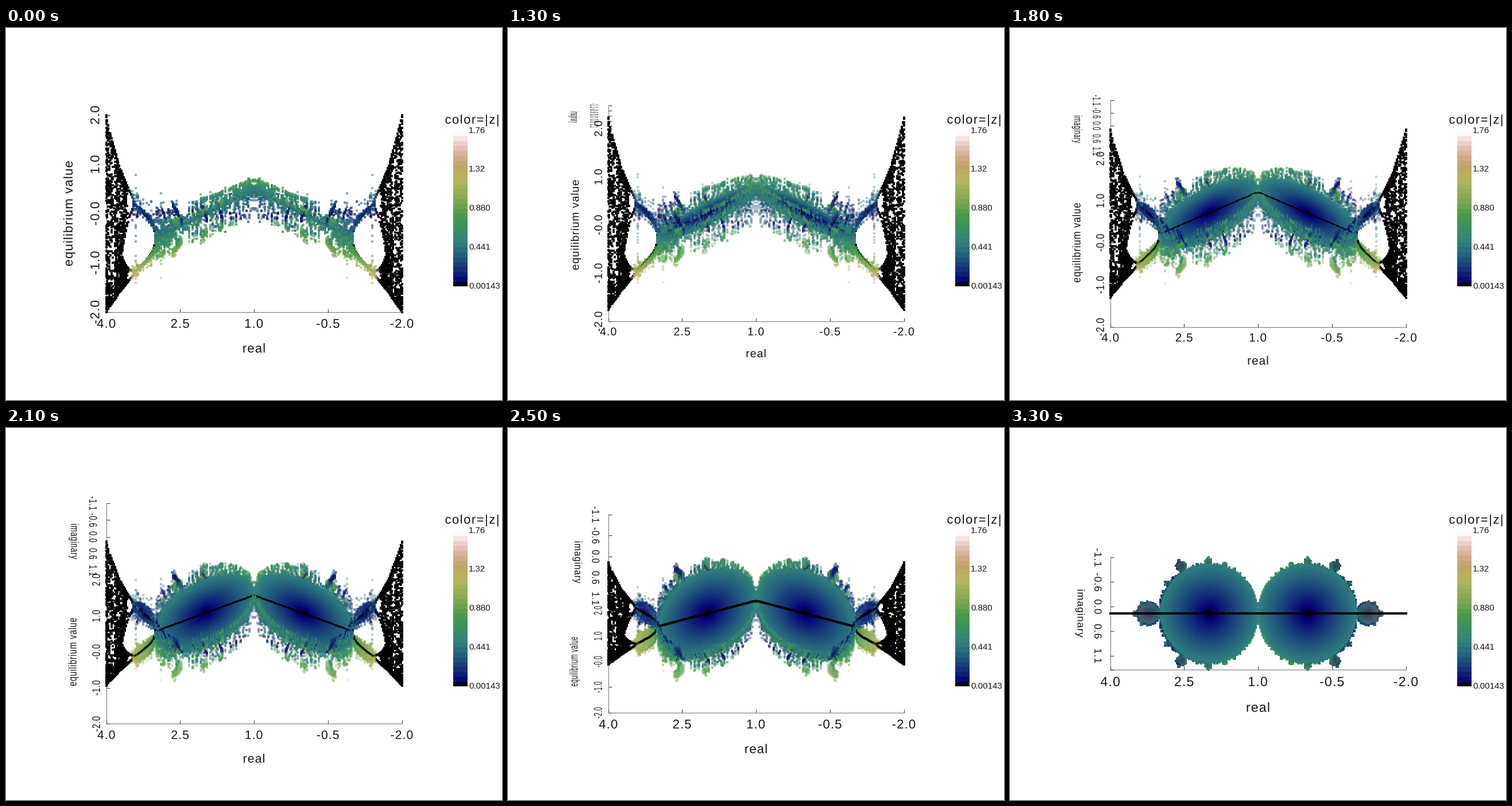
A matplotlib script for the animation above (4400 ms loop, 864x648 px).

```python
import numpy as np
import matplotlib.pyplot as plt
from matplotlib.animation import FuncAnimation
from matplotlib.collections import LineCollection
from matplotlib.patches import PathPatch
from matplotlib.path import Path
from matplotlib.textpath import TextPath

W, H = 864, 648
SCALE, LEFT, RIGHT, MID = 85.8, 174.5, 689.5, 323.3
IM_MAX = 1.14
STEPS, HOLD = 23, 10
EM = 23.1
INK = "#151515"
VMIN, VMAX = 0.00143, 1.76

plt.rcParams["font.family"] = "Liberation Sans"
cmap = plt.get_cmap("gist_earth", 64)

fig = plt.figure(figsize=(W / 100, H / 100), dpi=100, facecolor="white")
ax = fig.add_axes([0, 0, 1, 1])


# ---- data: attracting cycles of z -> z^2 + c with c = r/2 - r^2/4 ----
def cycles(r, keep, burn=200):
    """Return r, z and cycle length for every distinct point of the cycles."""
    c = r / 2 - r * r / 4
    z = np.full_like(c, 0.01)
    with np.errstate(all="ignore"):
        for n in range(burn):
            z = z * z + c
            if n % 40 == 39:
                ok = np.abs(z) < 4
                r, c, z = r[ok], c[ok], z[ok]
        orbit = []
        for _ in range(keep):
            z = z * z + c
            orbit.append(z)
    orbit = np.array(orbit).T
    ok = (np.abs(orbit) < 2.1).all(axis=1)
    r, orbit = r[ok], orbit[ok]
    key = np.round(orbit, 2)
    rank = np.argsort(key, axis=1)
    key = np.take_along_axis(key, rank, 1)
    orbit = np.take_along_axis(orbit, rank, 1)
    new = np.ones(key.shape, bool)
    new[:, 1:] = key[:, 1:] != key[:, :-1]
    row, col = np.nonzero(new)
    return r[row], orbit[row, col], new.sum(axis=1)[row]


re = np.linspace(-2, 4, 271)
im = np.linspace(-IM_MAX, IM_MAX, 121)
im = im[np.abs(im) > 1e-6]
plane = (re[:, None] + 1j * im[None, :]).ravel()

r1, z1, period = cycles(plane, 24)
rgba1 = cmap(np.clip((np.abs(z1) - VMIN) / (VMAX - VMIN), 0, 1))
rgba1[:, 3] = np.where(period == 1, 0.75, 0.35)

r2, z2, _ = cycles(re, 80)
rgba2 = np.tile([0, 0, 0, 0.87], (len(r2), 1))

real = np.r_[r1.real, r2]
imag = np.r_[r1.imag, 0 * r2]
height = np.r_[z1.real, z2]
rgba = np.r_[rgba1, rgba2]
# paint layers: 0 behind the real line, 1 the line itself, 2 in front of it
on_line = np.r_[0 * period, 0 * r2 + 1] > 0
LINE_BIAS = 0.035


def sx(r):
    return LEFT + (4 - r) / 6 * (RIGHT - LEFT)


def sy(h, i, th):
    return MID + SCALE * (i * np.sin(th) - h * np.cos(th))


# ---- lettering ----
def ink_end(s):
    return TextPath((0, 0), s, size=EM).get_extents().x1


def lettering(s, gap=0.05):
    """Outline of s with letter spacing, centred on the origin."""
    verts, codes, x = [], [], 0
    for ch in s:
        if ch != " ":
            p = TextPath((x, 0), ch, size=EM)
            verts.append(p.vertices)
            codes.append(p.codes)
        x += ink_end("|" + ch + "|") - ink_end("||") + gap * EM
    path = Path(np.concatenate(verts), np.concatenate(codes))
    box = path.get_extents()
    centre = [(box.x0 + box.x1) / 2, (box.y0 + box.y1) / 2]
    return Path(path.vertices - centre, path.codes)


class Label:
    def __init__(self, s, gap=0.05):
        self.base = lettering(s, gap)
        self.patch = PathPatch(self.base, fc=INK, lw=0, zorder=4)
        ax.add_patch(self.patch)

    def place(self, x, y, along, up):
        verts = self.base.vertices @ np.array([along, up]) + [x, y]
        self.patch.set_path(Path(verts, self.base.codes))


real_ticks = [4, 2.5, 1, -0.5, -2]
z_ticks = [2, 1, 0, -1, -2]
im_ticks = [-IM_MAX + 0.5 * k for k in range(5)]
real_labels = [Label(s) for s in ("4.0", "2.5", "1.0", "-0.5", "-2.0")]
z_labels = [Label(s) for s in ("2.0", "1.0", "-0.0", "-1.0", "-2.0")]
im_labels = [Label(s) for s in ("-1.1", "-0.6", "0.0", "0.6", "1.1")]
real_title, z_title, im_title = map(
    Label, ("real", "equilibrium value", "imaginary"))

# text size per axis as the view tilts
KEYS = [0, 1, 5, 11, 15, 19, 23]
REAL_SIZE = [.96, .83, .87, .92, .96, .99, 1]
Z_SIZE = [.96, .83, .85, .85, .87, .89, .9]
IM_SIZE = [.9, .89, .87, .83, .79, .77, .77]

# ---- colour bar ----
bands = np.arange(64) | 1
bands[0] = 0
ax.imshow(bands[::-1, None], cmap=cmap, aspect="auto", vmin=0, vmax=63,
          interpolation="nearest", extent=(779, 804, 450, 180))
for n, s in enumerate(("1.76", "1.32", "0.880", "0.441", "0.00143")):
    ax.text(806, 177.3 + 67.7 * n, s, fontsize=10.8, color=INK,
            va="center_baseline")
Label("color=|z|", 0.07).place(811.5, 161, (.95, 0), (0, -.95))

frame_line, = ax.plot([], [], color="#7c7c7c", lw=0.8, zorder=1)
ticks = LineCollection([], colors="#444444", linewidths=0.8, zorder=3)
ax.add_collection(ticks)
cloud = ax.scatter(real, height, s=2.88 ** 2, marker="s", c=rgba,
                   linewidths=0, zorder=2)
cloud.set_antialiased(False)

ax.set_xlim(0, W)
ax.set_ylim(H, 0)
ax.axis("off")


def draw(i):
    k = int(np.clip(i - HOLD, 0, STEPS))
    th = k / STEPS * np.pi / 2
    cos, sin = np.cos(th), np.sin(th)

    layer = np.where(on_line, 1, 2 * (imag * cos > LINE_BIAS))
    order = np.argsort(layer, kind="stable")
    pos = np.column_stack([sx(real), sy(height, imag, th)])
    cloud.set_offsets(pos[order])
    cloud.set_facecolors(rgba[order])

    top, floor = sy(2, -IM_MAX, th), sy(-2, IM_MAX, th)
    frame_line.set_data([LEFT, LEFT, RIGHT], [top, floor, floor])
    segs = [[(sx(r), floor), (sx(r), floor - 6)] for r in real_ticks]

    size = np.interp(k, KEYS, REAL_SIZE)
    flat = (size, 0), (0, -size)
    for r, label in zip(real_ticks, real_labels):
        label.place(sx(r), floor + 20.5 * size, *flat)
    real_title.place(sx(1), floor + 65 * size, *flat)

    size = np.interp(k, KEYS, Z_SIZE)
    rising = (0, -size * cos), (-size, 0)
    for h, label in zip(z_ticks, z_labels):
        y = sy(h, IM_MAX, th)
        segs.append([(LEFT, y), (LEFT + 6, y)])
        label.place(LEFT - 20.5 * size, y, *rising)
        label.patch.set_visible(k < STEPS)
    z_title.place(LEFT - 67 * size, sy(0, IM_MAX, th), *rising)
    z_title.patch.set_visible(k < STEPS)

    size = np.interp(k, KEYS, IM_SIZE)
    falling = (0, size * sin), (size, 0)
    for t, label in zip(im_ticks, im_labels):
        y = sy(2, t, th)
        segs.append([(LEFT, y), (LEFT + 6, y)])
        label.place(LEFT - 27.5 * size, y, *falling)
        label.patch.set_visible(k > 0)
    im_title.place(LEFT - 68 * size, sy(2, 0, th), *falling)
    im_title.patch.set_visible(k > 0)

    ticks.set_segments(segs)
    return cloud,


anim = FuncAnimation(fig, draw, frames=44, interval=100, repeat=True)
plt.show()
```
